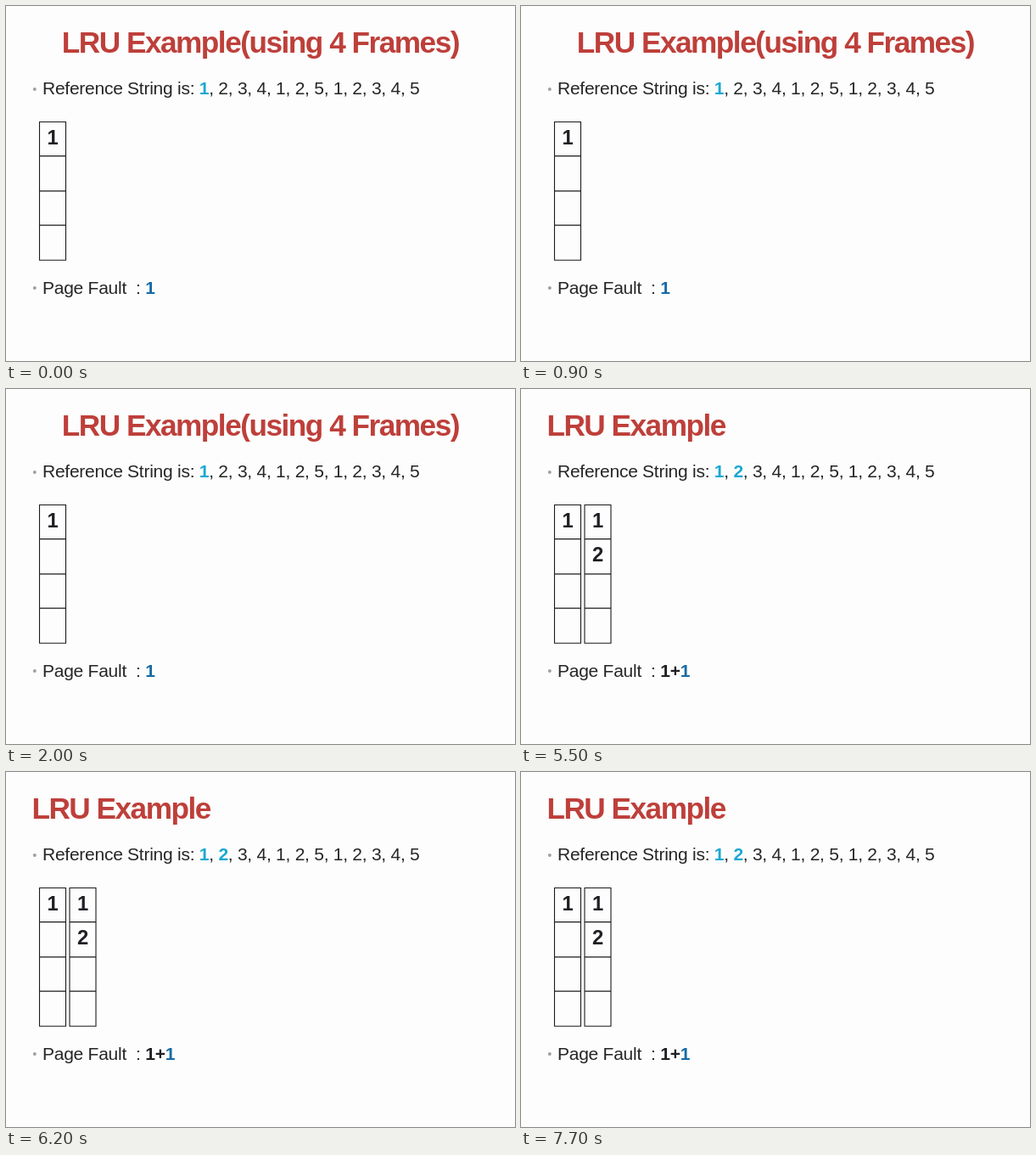
An HTML page that plays this animation: 600 by 418 pixels, repeating every 8 s.

```html
<!DOCTYPE html>
<html lang="en">
<head>
<meta charset="utf-8">
<title>LRU Example</title>
<style>
  html, body { margin: 0; width: 100%; height: 100%; overflow: hidden; background: #fdfdfd; }
  svg { display: block; width: 600px; height: 418px; }
  text { font: 21px "Liberation Sans", Arial, sans-serif; letter-spacing: -.26px; font-kerning: none; white-space: pre; fill: #262626; }
  .title { font-size: 35.2px; font-weight: bold; letter-spacing: -1.49px; fill: #be3f3a; }
  .cell { font-size: 23.8px; font-weight: bold; letter-spacing: 0; text-anchor: middle; fill: #1f1f24; }
  .b { font-weight: bold; fill: #1f1f24; }
  .seen { font-weight: bold; fill: #1ba8d3; }
  .fault { font-weight: bold; fill: #176ba5; }
  .grid { fill: none; stroke: #1a1a1a; stroke-width: 1.1; }
  .bullet { fill: #a0a0a0; }
  .one { animation: first 8s step-end infinite; }
  .two { animation: second 8s step-end infinite; }
  @keyframes first { 0% { visibility: visible; } 68.75%, 100% { visibility: hidden; } }
  @keyframes second { 0% { visibility: hidden; } 68.75%, 100% { visibility: visible; } }
</style>
</head>
<body>
<svg viewBox="0 0 600 418">
  <defs>
    <path id="column" class="grid" d="M.5 136.5h31v162.8H.5zM.5 176.6h31M.5 217.9h31M.5 258.1h31"/>
  </defs>

  <circle class="bullet" cx="33.8" cy="98" r="2"/>
  <circle class="bullet" cx="33.8" cy="332" r="2"/>
  <use href="#column" x="39"/>
  <text class="cell" x="55.2" y="163">1</text>

  <g class="one">
    <text class="title" x="65.8" y="54.8">LRU Example(using 4 Frames)</text>
    <text x="43" y="104">Reference String is: <tspan class="seen">1</tspan>, 2, 3, 4, 1, 2, 5, 1, 2, 3, 4, 5</text>
    <text x="43" y="338.5">Page Fault  : <tspan class="fault">1</tspan></text>
  </g>

  <g class="two">
    <text class="title" x="30.4" y="54.8">LRU Example</text>
    <text x="43" y="104">Reference String is: <tspan class="seen">1</tspan>, <tspan class="seen">2</tspan>, 3, 4, 1, 2, 5, 1, 2, 3, 4, 5</text>
    <use href="#column" x="74.5"/>
    <text class="cell" x="90.7" y="163">1</text>
    <text class="cell" x="90.7" y="203">2</text>
    <text x="43" y="338.5">Page Fault  : <tspan class="b">1+</tspan><tspan class="fault">1</tspan></text>
  </g>
</svg>
</body>
</html>
```
